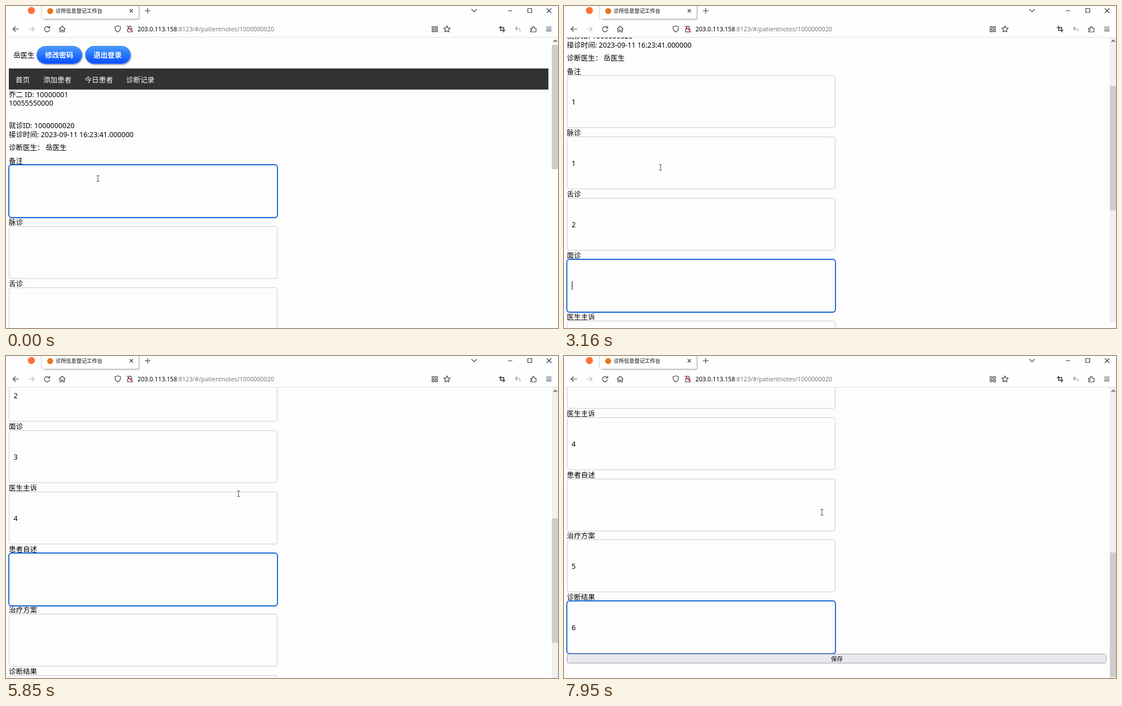
Animation, 978 px wide and 572 px high, one loop 8000 ms. Source, as an HTML page:

```html
<!DOCTYPE html>
<html lang="zh-CN">
<head>
<meta charset="utf-8">
<title>诊断记录</title>
<style>
html, body { margin: 0; width: 100%; height: 100%; overflow: hidden; background: #fdfdfd; }
svg { display: block; font: 12.5px "Noto Sans", "Noto Sans CJK SC", "Noto Sans CJK", sans-serif; }
.icon { fill: none; stroke: #3f3f45; stroke-width: 1.2; stroke-linecap: round; stroke-linejoin: round; }
.pale { stroke: #b9b9be; }
.box { fill: none; stroke: #ccc; }
.white { fill: #fff; }
.mid { text-anchor: middle; }
</style>
</head>
<body>
<svg width="978" height="572" viewBox="0 0 978 572">
  <defs>
    <linearGradient id="blue" x2="0" y2="1">
      <stop offset="0" stop-color="#4c9bff"/>
      <stop offset=".45" stop-color="#2a78fb"/>
      <stop offset="1" stop-color="#0a4dff"/>
    </linearGradient>
    <filter id="soft" x="-10%" y="-20%" width="120%" height="150%">
      <feDropShadow dx="1" dy="1.5" stdDeviation="1.2" flood-opacity=".4"/>
    </filter>
  </defs>

  <g id="page">
    <text x="13" y="92">岳医生</text>
    <g fill="url(#blue)" stroke="#3a80f0" filter="url(#soft)">
      <rect x="54.5" y="71.5" width="80" height="31" rx="15.5"/>
      <rect x="140.5" y="71.5" width="80" height="31" rx="15.5"/>
    </g>
    <g class="white mid" font-weight="700">
      <text x="94.3" y="92">修改密码</text>
      <text x="180" y="92">退出登录</text>
    </g>
    <rect x="5" y="111" width="956" height="37.5" fill="#323232"/>
    <g class="white">
      <text x="17" y="135.5">首页</text>
      <text x="66" y="135.5">添加患者</text>
      <text x="139.5" y="135.5">今日患者</text>
      <text x="213" y="135.5">诊断记录</text>
    </g>
    <text x="5" y="161.5">乔二 ID: 10000001</text>
    <text x="5" y="177.3">10055550000</text>
    <text x="5" y="216.5">就诊ID: 1000000020</text>
    <text x="5" y="232.5">接诊时间: 2023-09-11 16:23:41.000000</text>
    <text x="5" y="255.5">诊断医生：</text>
    <text x="70" y="255.5">岳医生</text>
    <g id="fields"></g>
    <rect id="focus" x="5" width="476" height="94" rx="5" fill="none" stroke="#1b68d8" stroke-width="1.9"/>
    <rect id="caret" width="1" height="15"/>
    <rect x="5.5" y="1138.5" width="955" height="16" rx="3" fill="#e9e9ed" stroke="#a0a0aa"/>
    <text class="mid" x="483.5" y="1150.5" font-size="10.5">保存</text>
  </g>

  <rect id="track" x="967" y="56" width="11" fill="#f0f0f0"/>
  <rect id="thumb" x="967" width="11" height="221" fill="#cdcdcd"/>
  <path class="icon" style="stroke:#505050;stroke-width:1.6" d="M970.5 63.5l2.7-2.8 2.7 2.8"/>

  <!-- browser bars -->
  <rect width="978" height="56" fill="#fefefe"/>
  <path d="M0 55.5H978" stroke="#e0e0e2"/>
  <path d="M62.5 0V23" stroke="#d0d0d4"/>
  <rect x="65" y="-6" width="170" height="28.5" rx="3" fill="#fff" filter="url(#soft)"/>
  <circle cx="45" cy="8" r="6.3" fill="#ff7139"/>
  <circle cx="78.3" cy="9" r="5.3" fill="#e8761e"/>
  <text x="88" y="12" font-size="9.2">诊所信息登记工作台</text>
  <text x="233" y="44.5" font-size="10.75">203.0.113.158<tspan fill="#7b7b80">:8123/#/patientnotes/1000000020</tspan></text>
  <g class="icon">
    <path d="M219.5 6l5 5m0-5l-5 5M246.5 8.5h9m-4.500-4.500v9"/>
    <path d="M825 6l4.300 4.300L833.600 6M889.500 8.500h7M924.500 4.500h7v7h-7zM958.500 4.500l7.500 7.500m0-7.500l-7.500 7.500"/>
    <path d="M22.500 41H12.500m4-4l-4 4 4 4"/>
    <path class="pale" d="M40 41h10m-4-4l4 4-4 4"/>
    <path d="M76.500 38.500a4.600 4.600 0 1 0 .8 3.500M77.500 35.800v3.200h-3.200"/>
    <path d="M94.500 40.500l5-4.700 5 4.700M95.700 40v6h2.600v-3.500h2.600V46h2.600v-6"/>
    <path d="M198 35.300l4.800 1.500c.3 5-1.600 8-4.800 9.500-3.200-1.500-5.100-4.500-4.800-9.500z"/>
    <path d="M215.500 40.500h7.500v5.500h-7.500zM216.800 40.500v-2.300a2.500 2.500 0 0 1 5 0v2.300"/>
    <path stroke="#e22850" d="M214.500 35.500l10 10.500"/>
    <path d="M755 36.500h3.500v3.500H755zM760.800 36.500h3.500v3.500h-3.500zM755 42.200h3.500v3.500H755zM760.800 42.200h3.500v3.500h-3.500z"/>
    <path d="M781.300 35.300l1.700 3.600 4 .5-2.900 2.700.7 3.900-3.500-1.900-3.500 1.900.7-3.900-2.900-2.700 4-.5z"/>
    <path stroke-width="1.700" d="M876.300 36v7.300h7.500M874 38.300h7.800V46"/>
    <path stroke="#97979c" d="M905.500 37l-3 3 3 3M902.500 40h5c2.500 0 3.500 2 3.500 5"/>
    <path d="M929.500 39.500h3.300c-1.300-4.300 4.300-4.300 3.200 0h3v6.500h-9.500v-2.200c3.300.5 3.300-3 0-2.500z"/>
    <path d="M957.500 37.500h8.500m-8.500 3.300h8.500m-8.500 3.300h8.500"/>
  </g>

  <g id="mouse">
    <path id="beam" d="M-2.500-5h2l.5.500.5-.5h2M0-4.500v9M-2.500 5h2l.5-.5.5.5h2" fill="none" stroke="#444"/>
    <path id="arrow" d="M-.5-.5v10.500l2.400-2.200 1.700 3.900 1.700-.8-1.700-3.700h3.200z" fill="#fff" stroke="#333" stroke-width=".9"/>
  </g>
</svg>
<script>
const LOOP = 8000, TOP = 282.5, PITCH = 108.9;
const $ = id => document.getElementById(id);
const set = (id, attrs) => { for (const k in attrs) $(id).setAttribute(k, attrs[k]); };
const show = (id, on) => { $(id).style.display = on ? '' : 'none'; };

const labels = ['备注', '脉诊', '舌诊', '面诊', '医生主诉', '患者自述', '治疗方案', '诊断结果'];
const values = ['1', '1', '2', '3', '4', '', '5', '6'];
const typedAt = [1490, 1730, 2860, 3570, 5010, LOOP, 6120, 7500];
const fieldTop = i => TOP + Math.round(PITCH * i);

// the screen only refreshes at these moments
const ticks = [0, 120, 260, 400, 550, 690, 810, 930, 1490, 1610, 1730, 2120, 2560, 2860, 3160, 3570, 3870,
  4460, 4600, 4740, 4880, 5010, 5140, 5280, 5550, 5700, 5840, 5980, 6120,
  6560, 6710, 6860, 7010, 7170, 7330, 7500, 7650, 7800, 7950];

// eased tracks: [time, value, ...]
const scrolling = [[0, 0], [60, 0], [500, 318], [640, 318], [900, 159], [4420, 159], [4850, 318],
  [5480, 318], [5840, 477], [6750, 477], [7150, 609]];
const pointer = [[0, 163, 306], [100, 163, 306], [400, 171, 286], [4420, 171, 286], [5200, 399, 244], [5500, 399, 244],
  [5840, 412, 244], [6500, 412, 244], [6700, 427, 244], [6850, 427, 244], [7330, 430, 250], [7500, 430, 250], [7950, 457, 277]];

// stepped tracks: [time, value]
const focused = [[0, 0], [1610, 1], [2560, 2], [3160, 3], [3870, 4], [5280, 5], [5980, 6], [6560, 7]];
const caretOn = [[0, 0], [1490, 1], [2120, 0], [2560, 1], [3570, 0], [6120, 1], [7950, 0]];
const trackEnd = [[0, 56], [120, 536], [690, 562], [4460, 572]];

const step = (track, t) => track.findLast(k => k[0] <= t)[1];

function ease(track, t, n = 1) {
  const i = track.findLastIndex(k => k[0] <= t), a = track[i], b = track[i + 1];
  if (!b) return a[n];
  const p = (t - a[0]) / (b[0] - a[0]);
  return a[n] + (b[n] - a[n]) * p * p * (3 - 2 * p);
}

$('fields').innerHTML = labels.map((label, i) => {
  const y = fieldTop(i);
  return `<text x="5" y="${y - 3}">${label}</text>
    <rect class="box" x="5.5" y="${y}" width="475" height="92.5" rx="4"/>
    <text id="value${i}" x="13.5" y="${y + 51.5}">${values[i]}</text>`;
}).join('');

function draw(now) {
  const t = ticks.findLast(k => k <= now % LOOP);
  const scroll = Math.round(ease(scrolling, t));
  const x = Math.round(ease(pointer, t)), y = Math.round(ease(pointer, t, 2));
  const field = step(focused, t), top = fieldTop(field);

  set('page', { transform: `translate(0 ${-scroll})` });
  set('thumb', { y: 69 + scroll * .46 });
  set('track', { height: step(trackEnd, t) - 56 });
  set('focus', { y: top - .5 });
  set('caret', { x: t >= typedAt[field] ? 20 : 14, y: top + 38.5 });
  show('caret', step(caretOn, t));
  values.forEach((_, i) => show('value' + i, t >= typedAt[i]));

  const depth = y + scroll - TOP;
  const overField = depth >= 0 && depth % PITCH < 92.5;
  set('mouse', { transform: `translate(${x} ${y + .5})` });
  show('beam', overField);
  show('arrow', !overField);
}

const start = performance.now();
function loop() {
  draw(performance.now() - start);
  requestAnimationFrame(loop);
}
loop();
</script>
</body>
</html>
```
